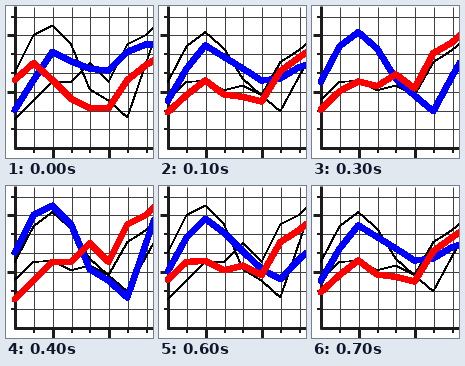
A matplotlib script that plays this animation: 147 px wide and 152 px high, repeating every 800 ms.

```python
import numpy as np
import matplotlib.pyplot as plt
from matplotlib.animation import FuncAnimation

W, H, DPI = 147, 152, 100
STEP = 18.75
LEFT, BOTTOM = 8.3, 141
COLS = np.arange(9)
XS = LEFT + STEP * COLS
INK, GRID = "#1c1c1c", "#404040"

# Key heights in grid steps above the axis, at both ends of the swing.
BLUE_FROM = np.array([2, 3.6, 5.1, 4.6, 4.2, 4.1, 5.1, 5.5, 5.5])
BLUE_TO = np.array([4, 6, 6.5, 5.5, 3.1, 2.5, 1.6, 4.5, 7.4])
RED_FROM = np.array([3.6, 4.5, 3.6, 2.6, 2.1, 2.1, 3.6, 4.4, 5])
RED_TO = np.array([1.5, 2.5, 3.5, 3.5, 4.5, 3.5, 5.5, 6, 7])


def px(width):
    return width * 72 / DPI


def to_y(level):
    return BOTTOM - STEP * level


def blue(t):
    """The right side sags more and more in mid-swing."""
    sag = np.where(COLS > 3, 0.59 * COLS - 2.77, 0) * np.sin(np.pi * t)
    return to_y(BLUE_FROM + (BLUE_TO - BLUE_FROM) * t - sag)


def red(t):
    """The left end dips during the first half of the swing."""
    dip = np.where(COLS < 2, 1.2, 0) * max(0, np.sin(2 * np.pi * t))
    return to_y(RED_FROM + (RED_TO - RED_FROM) * t - dip)


WIDE = blue(1), red(1)
NARROW = blue(0.75), red(0.5)

fig = plt.figure(figsize=(W / DPI, H / DPI), dpi=DPI, facecolor="white")
ax = fig.add_axes([0, 0, 1, 1])
ax.set_xlim(0, W)
ax.set_ylim(H, 0)
ax.axis("off")


def segment(x0, y0, x1, y1, width, color=INK, z=2):
    ax.plot([x0 + .5, x1 + .5], [y0 + .5, y1 + .5], color=color, lw=px(width),
            solid_capstyle="butt", zorder=z, snap=True)


for i in range(1, 8):
    x = round(LEFT + i * STEP)
    y = round(to_y(i))
    segment(x, 0, x, BOTTOM, 1, GRID, 1)
    segment(LEFT, y, W, y, 1, GRID, 1)
    x_major, y_major = i in (2, 5), i in (3, 6)
    segment(x, BOTTOM, x, 151 if x_major else 146, 3 if x_major else 2)
    segment(0 if y_major else 4, y, LEFT, y, 3 if y_major else 2)

segment(8, -1, 8, BOTTOM + 1, 3)
segment(7, BOTTOM, W, BOTTOM, 3)


def curve(color, width, z):
    return ax.plot([], [], color=color, lw=px(width), zorder=z,
                   antialiased=False, solid_capstyle="round",
                   solid_joinstyle="round")[0]


thin_lines = [curve("black", 0.8, 3) for _ in range(2)]
lines = [*thin_lines, curve("#0000ff", 5.3, 4), curve("#ff0000", 5.3, 5)]


def update(frame):
    pose = 4 - abs(frame % 8 - 4)
    t = pose / 4
    thin = WIDE if pose in (0, 2) else NARROW
    for line, ys in zip(lines, [*thin, blue(t), red(t)]):
        line.set_data(XS + .5, ys + .5)
    return lines


anim = FuncAnimation(fig, update, frames=8, interval=100, repeat=True,
                     repeat_delay=0)
plt.show()
```
